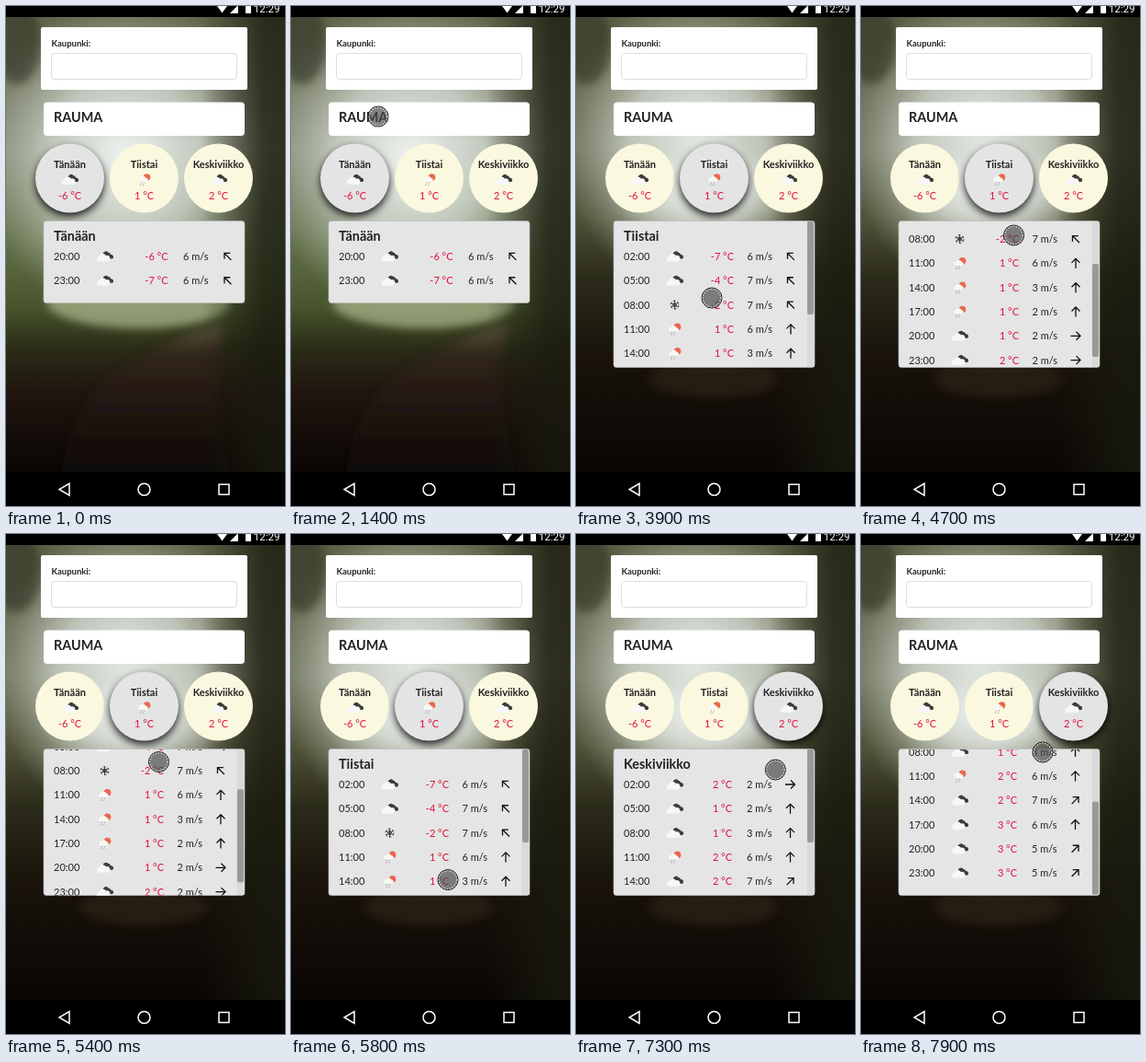
Recreate the animation shown at these times as an HTML page. Size 304 by 543 pixels, loop 8000 ms.

```html
<!DOCTYPE html>
<html lang="fi">
<head>
<meta charset="utf-8">
<style>
  html, body { margin: 0; width: 100%; height: 100%; overflow: hidden; background: #000; }
  svg { display: block; }
  text { font: 11px Lato, sans-serif; fill: #222; }
  .bold { font-weight: 700; }
  .title { font-size: 14.400px; font-weight: 700; }
  .mid { text-anchor: middle; }
  .end { text-anchor: end; }
  .temp { fill: #e0103c; }
</style>
</head>
<body>
<svg id="stage" width="304" height="543" viewBox="0 0 304 543">
  <defs>
    <linearGradient id="shortSky" x2="0" y2="1">
      <stop offset="0" stop-color="#5d6148"/>
      <stop offset=".3" stop-color="#858b76"/>
      <stop offset=".5" stop-color="#62704a"/>
      <stop offset=".64" stop-color="#48552c"/>
      <stop offset=".73" stop-color="#2a2c17"/>
      <stop offset=".82" stop-color="#21160f"/>
      <stop offset="1" stop-color="#090504"/>
    </linearGradient>
    <linearGradient id="tallSky" x2="0" y2="1">
      <stop offset="0" stop-color="#5b5e45"/>
      <stop offset=".3" stop-color="#70745d"/>
      <stop offset=".45" stop-color="#505238"/>
      <stop offset=".58" stop-color="#2b2b1a"/>
      <stop offset=".75" stop-color="#19130b"/>
      <stop offset="1" stop-color="#090504"/>
    </linearGradient>
    <linearGradient id="road" x2="0" y2="1">
      <stop offset="0" stop-color="#6a5b49"/>
      <stop offset=".2" stop-color="#33251c"/>
      <stop offset="1" stop-color="#0e0806"/>
    </linearGradient>
    <radialGradient id="mist">
      <stop offset="0" stop-color="#f0f4f2"/>
      <stop offset=".5" stop-color="#d9dfd8" stop-opacity=".75"/>
      <stop offset="1" stop-color="#b4bba8" stop-opacity="0"/>
    </radialGradient>
    <linearGradient id="rightTrees">
      <stop offset=".7" stop-color="#191a0e" stop-opacity="0"/>
      <stop offset=".92" stop-color="#191a0e" stop-opacity=".75"/>
      <stop offset="1" stop-color="#191a0e" stop-opacity=".8"/>
    </linearGradient>
    <filter id="soft" x="-50%" y="-50%" width="200%" height="200%"><feGaussianBlur stdDeviation="5"/></filter>
    <g id="cloud">
      <path fill="#3c3c3c" d="M-1.500-1a3.200 3.200 0 0 1 5.500-3.200 2.500 2.500 0 0 1 2.500 2.200 2.500 2.500 0 0 1 2 4.500H3z"/>
      <path fill="#f7f7f7" d="M-6.500 5.500a2.800 2.800 0 0 1 0-5.500 4.500 4.500 0 0 1 8-1 3.300 3.300 0 0 1 2 6.500z"/>
    </g>
    <g id="rain">
      <circle cx="3" cy="-2.500" r="3.800" fill="#e9684c"/>
      <path fill="#f7f7f7" d="M-4 2.500a2.300 2.300 0 0 1 0-4.600 3.400 3.400 0 0 1 6 .4 2.200 2.200 0 0 1 1 4.200z"/>
      <path stroke="#888" stroke-width=".9" stroke-dasharray="1.200 1.200" d="M-3 3l-1 4M0 3l-1 4"/>
    </g>
    <g id="snow" fill="none" stroke="#333" stroke-width=".9">
      <path d="M0-5V5M-4.400-2.500L4.400 2.500M-4.400 2.500L4.400-2.500"/>
      <circle r="2"/>
      <circle r="4.400" stroke-dasharray="2.600 2"/>
    </g>
    <path id="arrow" d="M0 5.500V-5M-4.500-.5L0-5 4.500-.5" fill="none" stroke="#111" stroke-width="1.300"/>
  </defs>

  <g id="shortScene">
    <rect width="304" height="510" fill="url(#shortSky)"/>
    <ellipse cx="130" cy="165" rx="160" ry="175" fill="url(#mist)"/>
    <ellipse cx="145" cy="322" rx="100" ry="28" fill="#a9b38a" opacity=".75" filter="url(#soft)"/>
    <path d="M232 346Q180 360 125 395T60 510H245Q220 420 238 346z" fill="url(#road)" opacity=".7" filter="url(#soft)"/>
    <ellipse cx="12" cy="40" rx="26" ry="45" fill="#2e3320" opacity=".6" filter="url(#soft)"/>
  </g>
  <g id="tallScene">
    <rect width="304" height="510" fill="url(#tallSky)"/>
    <ellipse cx="130" cy="150" rx="145" ry="165" fill="url(#mist)"/>
    <ellipse cx="140" cy="195" rx="110" ry="65" fill="url(#mist)"/>
    <ellipse cx="150" cy="405" rx="70" ry="20" fill="#2f2115" opacity=".7" filter="url(#soft)"/>
    <ellipse cx="12" cy="40" rx="26" ry="45" fill="#2e3320" opacity=".6" filter="url(#soft)"/>
  </g>
  <rect width="304" height="510" fill="url(#rightTrees)"/>

  <path d="M0 0H304V12H0zM0 506H304V543H0z"/>
  <g fill="#fff">
    <path d="M230 0H241L235.500 7.500zM253 0V8H244L252 0zM261 0H267V8H261z"/>
    <text x="298.500" y="7" class="end" style="font:11.500px Roboto,sans-serif;fill:#fff">12:29</text>
  </g>
  <g fill="none" stroke="#fff" stroke-width="1.500">
    <path d="M69 518.500V531.500L58 525z"/>
    <circle cx="150.500" cy="525" r="6.500"/>
    <rect x="232" y="519.500" width="11" height="11"/>
  </g>

  <rect x="38" y="23" width="225" height="68" rx="2" fill="#fff"/>
  <text x="49.500" y="44" class="bold" style="font-size:9.500px">Kaupunki:</text>
  <rect x="49.500" y="51.500" width="202" height="28" rx="3" fill="#fff" stroke="#ddd"/>
  <rect x="41" y="104.500" width="219" height="36.500" rx="4" fill="#fff"/>
  <text x="52" y="126" class="title">RAUMA</text>

  <g id="days"></g>
  <rect id="panel" x="41" y="233.500" width="219" rx="3" fill="#e5e5e5" stroke="#bbb" stroke-width=".6"/>
  <svg id="view" x="41" y="234" width="219"><g id="list"></g></svg>
  <g id="bar">
    <rect x="251.500" y="234" width="8" height="158" fill="#dadada"/>
    <rect id="thumb" x="252" width="7" height="101" rx="2" fill="#999"/>
  </g>
  <g id="cursor">
    <circle r="11" fill="#484848" fill-opacity=".68" stroke="#222"/>
    <circle r="9.800" fill="none" stroke="#ddd" stroke-width="1.200" stroke-dasharray="1.500 1.500"/>
  </g>
</svg>
<script>
const $ = id => document.getElementById(id);
const clamp = (v, lo, hi) => Math.min(hi, Math.max(lo, v));
const LOOP = 8000, STEP = 100, MAX_SCROLL = 88;
const NW = -45, N = 0, NE = 45, E = 90;

// Each row: hour, icon, temperature, wind speed, wind direction
const days = [
  { name: 'Tänään', icon: 'cloud', temp: -6, x: 69.5, right: 176.5, wind: 193, arrow: 241.5, rows: [
    [20, 'cloud', -6, 6, NW], [23, 'cloud', -7, 6, NW]] },
  { name: 'Tiistai', icon: 'rain', temp: 1, x: 150.5, right: 172, wind: 186.5, arrow: 234, rows: [
    [2, 'cloud', -7, 6, NW], [5, 'cloud', -4, 7, NW], [8, 'snow', -2, 7, NW], [11, 'rain', 1, 6, N],
    [14, 'rain', 1, 3, N], [17, 'rain', 1, 2, N], [20, 'cloud', 1, 2, E], [23, 'cloud', 2, 2, E]] },
  { name: 'Keskiviikko', icon: 'cloud', temp: 2, x: 231.5, right: 170, wind: 186, arrow: 233.5, rows: [
    [2, 'cloud', 2, 2, E], [5, 'cloud', 1, 2, N], [8, 'cloud', 1, 3, N], [11, 'rain', 2, 6, N],
    [14, 'cloud', 2, 7, NE], [17, 'cloud', 3, 6, N], [20, 'cloud', 3, 5, NE], [23, 'cloud', 3, 5, NE]] }
];

// Cursor path: time, x, y
const path = [
  [1000, 60, 19], [1400, 95, 120], [1700, 133, 222], [1800, 129, 218], [2000, 152, 197],
  [3000, 152, 197], [3500, 143, 331], [3900, 148, 317], [4200, 155, 179], [4500, 158, 386],
  [4700, 166.5, 249], [4800, 166.5, 240], [5000, 166.5, 227], [5200, 166.5, 227],
  [5400, 166.5, 247.5], [5700, 170, 392], [6100, 174, 326], [6300, 213, 254],
  [6700, 230, 191], [7200, 230, 191], [7500, 192, 386], [7900, 198, 237]
];

function cursorAt(t) {
  const i = path.findIndex(p => p[0] >= t);
  if (i === 0) return path[0].slice(1);
  const a = path[i - 1], b = path[i], k = (t - a[0]) / (b[0] - a[0]);
  return [a[1] + (b[1] - a[1]) * k, a[2] + (b[2] - a[2]) * k];
}

function scrollAt(t, y) {
  const grip = t >= 7500 ? 386 : t < 4000 || t > 6100 ? 0 : t < 5000 ? 320.5 : 315;
  return clamp(grip - y, 0, MAX_SCROLL);
}

function rowMarkup([hour, icon, temp, speed, turn], i, day) {
  const y = 272 + i * 26.3;
  return `<text x="52" y="${y + 4}">${String(hour).padStart(2, 0)}:00</text>
    <use href="#${icon}" x="107.500" y="${y}"/>
    <text x="${day.right}" y="${y + 4}" class="temp end">${temp} °C</text>
    <text x="${day.wind}" y="${y + 4}">${speed} m/s</text>
    <use href="#arrow" transform="translate(${day.arrow} ${y}) rotate(${turn})"/>`;
}

$('days').innerHTML = days.map(d => `
  <circle cx="${d.x}" cy="187" r="37.500"/>
  <text x="${d.x}" y="176" class="bold mid">${d.name}</text>
  <use href="#${d.icon}" x="${d.x}" y="188.500"/>
  <text x="${d.x}" y="209.500" class="temp mid">${d.temp} °C</text>`).join('');
const discs = $('days').querySelectorAll('circle');

let shown = -1;
function showList(index) {
  if (index === shown) return;
  shown = index;
  const day = days[index], tall = index > 0, height = tall ? 158.5 : 88.5;
  $('list').innerHTML = `<text x="52" y="255" class="title">${day.name}</text>` +
    day.rows.map((row, i) => rowMarkup(row, i, day)).join('');
  $('panel').setAttribute('height', height + .5);
  $('view').setAttribute('height', height);
  $('view').setAttribute('viewBox', `41 234 219 ${height}`);
  $('bar').style.display = $('tallScene').style.display = tall ? '' : 'none';
  $('shortScene').style.display = tall ? 'none' : '';
}

function paintDisc(disc, gray, shadow) {
  const mix = (a, b) => a + (b - a) * gray;
  disc.setAttribute('fill', `rgb(${mix(250, 228)},${mix(248, 228)},${mix(222, 229)})`);
  disc.style.filter = shadow ? `drop-shadow(0 4px 4px rgba(0,0,0,${shadow}))` : '';
}

function draw(now) {
  const t = Math.floor(now % LOOP / STEP) * STEP;
  showList(t < 2400 ? 0 : t < 6900 ? 1 : 2);

  const toTuesday = clamp((t - 3000) / 300, 0, 1), toWednesday = clamp((t - 6800) / 300, 0, 1);
  const grays = [1 - toTuesday, toTuesday - toWednesday, toWednesday];
  const fade = t >= 2400 && t < 3100 ? .5 : .85;
  grays.forEach((gray, i) => paintDisc(discs[i], gray, gray * fade));

  const visible = t >= 1000;
  $('cursor').style.display = visible ? '' : 'none';
  const [x, y] = visible ? cursorAt(t) : [0, 0];
  $('cursor').setAttribute('transform', `translate(${x} ${y})`);
  const scroll = scrollAt(t, y);
  $('list').setAttribute('transform', `translate(0 ${-scroll})`);
  $('thumb').setAttribute('y', 234 + scroll * 56.5 / MAX_SCROLL);
}

const start = performance.now();
function tick() {
  draw(performance.now() - start);
  requestAnimationFrame(tick);
}
tick();
</script>
</body>
</html>
```
